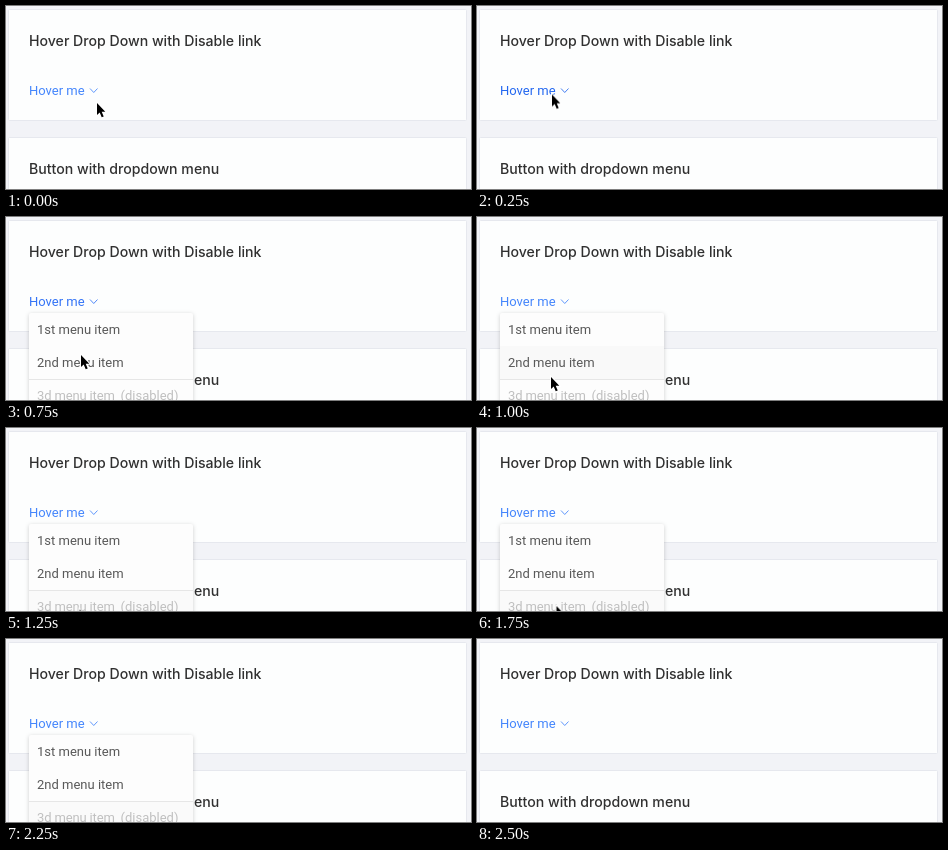
These frames come from a looping animation (465 by 183 pixels, 3 s). An HTML page:

```html
<!DOCTYPE html>
<html lang="en">
<head>
<meta charset="utf-8">
<title>Hover dropdown</title>
<style>
  html, body { margin: 0; width: 100%; height: 100%; overflow: hidden; background: #f2f3f7; }
  svg { display: block; width: 465px; height: 183px; }
  .card { fill: #fdfefe; stroke: #e6e8ee; }
  .title { font: 500 14.12px Inter, sans-serif; fill: #303030; }
  .link, .item { font: 13px Roboto, sans-serif; }
  .link text { fill: currentColor; }
  .item { fill: #595959; }
  .off { fill: #c0c0c0; }
  .tight { letter-spacing: -.15px; }
  .panel { fill: #fdfdfd; filter: drop-shadow(0 1px 2px rgba(0, 0, 0, .19)); }
  .link, .menu, .row2, .row3, .cursor { animation: 3s step-end infinite; }
  .link { animation-name: link; }
  .menu { animation-name: menu; }
  .row2 { animation-name: row2; }
  .row3 { animation-name: row3; }
  .cursor { animation-name: cursor; }

  @keyframes link {
    0%, 33.333% { color: #4586fc; }
    8.333% { color: #2468f0; }
    25% { color: #3474f6; }
  }
  @keyframes menu {
    0%, 83.333% { visibility: hidden; }
    16.667% { visibility: visible; }
  }
  @keyframes row2 {
    0%, 41.667% { fill: #fdfdfd; }
    33.333% { fill: #f9f9f9; }
  }
  @keyframes row3 {
    0% { fill: #fdfdfd; }
    41.667% { fill: #fafafa; }
  }
  @keyframes cursor {
    0% { transform: translate(91px, 97px); }
    8.333% { transform: translate(75px, 88.5px); }
    25% { transform: translate(75px, 138px); }
    33.333% { transform: translate(74px, 160px); }
    41.667% { transform: translate(73.5px, 181.5px); }
    50% { transform: translate(75px, 180.5px); }
    58.333% { transform: translate(79.5px, 178px); }
    66.667% { transform: translate(105px, 164.5px); }
    75%, 100% { transform: translate(120px, 200px); }
  }
</style>
</head>
<body>
<svg viewBox="0 0 465 183">
  <rect class="card" x="2.5" y="3.5" width="458" height="111" rx="1"/>
  <rect class="card" x="2.5" y="131.5" width="458" height="80" rx="1"/>
  <text class="title" x="23" y="40">Hover Drop Down with Disable link</text>
  <text class="title" x="23" y="168">Button with dropdown menu</text>

  <g class="link">
    <text x="23" y="89">Hover me</text>
    <path d="M84 82.5l3.75 4 3.75-4" fill="none" stroke="currentColor" stroke-width=".85"/>
  </g>

  <g class="menu">
    <rect class="panel" x="23" y="96" width="164" height="110" rx="2"/>
    <rect class="row2" x="23" y="129" width="164" height="33"/>
    <rect class="row3" x="23" y="163" width="164" height="33"/>
    <path d="M23 162.5h164" stroke="#e6e6e6"/>
    <text class="item" x="31" y="117">1st menu item</text>
    <text class="item" x="31" y="150">2nd menu item</text>
    <text class="item off tight" x="31" y="183">3d menu item</text>
    <text class="item off" x="114.5" y="183">(disabled)</text>
  </g>

  <path class="cursor" d="M0 0V12L2.7 9.5 4.7 14.2 6.7 13.4 4.7 8.7H8.3Z" fill="#000" stroke="#fff" stroke-width="2" paint-order="stroke"/>
</svg>
</body>
</html>
```
